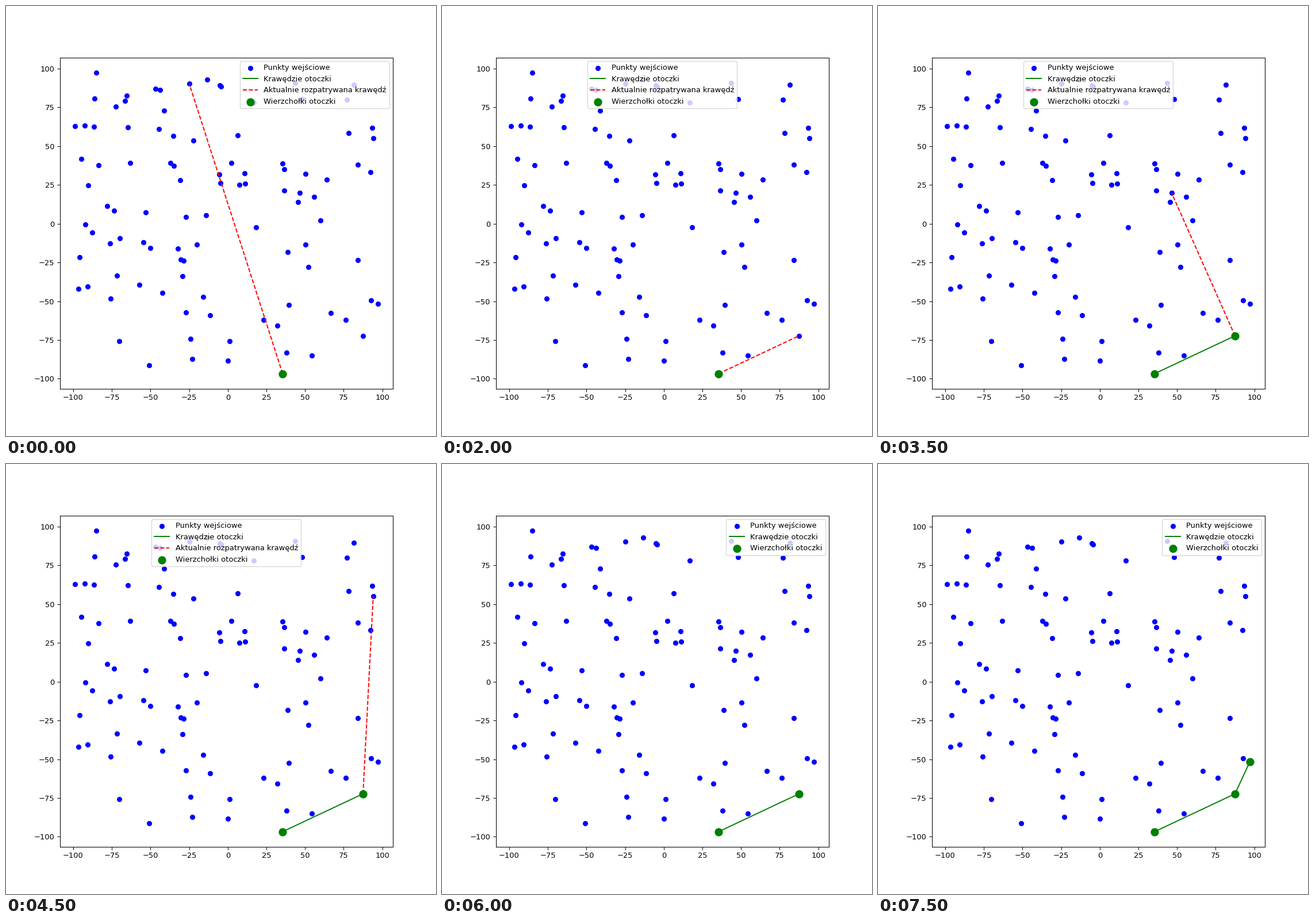
Animation, 748 px wide and 748 px high, one loop 8000 ms. Source, as a matplotlib script:

```python
import random

import matplotlib.pyplot as plt
from matplotlib.animation import FuncAnimation

random.seed(12)
COUNT = 100

START = (35.5, -96.7)
CORNERS = [(-85.1, 97.4), (-98.9, 63.0)]
# Points that become candidates, in scanning order
SCAN = [(-24.9, 90.2), (46.5, 19.8), (66.6, -57.5), (93.4, 61.7), (94.1, 55.1),
        (54.4, -85.1), (92.7, -49.6), (87.5, -72.3), (97.1, -51.6)]


def cross(o, a, b):
    return (a[0] - o[0]) * (b[1] - o[1]) - (a[1] - o[1]) * (b[0] - o[0])


def candidates(vertex, scan):
    """Each point that turns further clockwise than the best one so far."""
    best = scan[0]
    found = [best]
    for point in scan[1:]:
        if cross(vertex, best, point) < 0:
            best = point
            found.append(best)
    return found


# One step per candidate, then one without a candidate
hull, steps = [START], []
for first in (0, 0, 3):
    found = candidates(hull[-1], SCAN[first:])
    steps += [(len(hull), target) for target in found + [None]]
    hull.append(found[-1])

# Fill up with random points inside the hull
points = [START] + CORNERS + SCAN
while len(points) < COUNT:
    point = random.uniform(-98, 97), random.uniform(-93, 97)
    if all(cross(a, b, point) > 0 for a, b in zip(hull, hull[1:])):
        points.append(point)

fig, ax = plt.subplots(figsize=(8, 8), dpi=93.5)


def draw(i):
    size, target = steps[i]
    done = hull[:size]
    ax.clear()
    ax.scatter(*zip(*points), color="blue", label="Punkty wejściowe")
    ax.plot(*zip(*done), "g-", label="Krawędzie otoczki")
    if target:
        ax.plot(*zip(done[-1], target), "r--",
                label="Aktualnie rozpatrywana krawędź")
    ax.scatter(*zip(*done), color="green", s=100, zorder=5,
               label="Wierzchołki otoczki")
    # The legend keeps clear of edges that end on the right
    side = "center" if target and target[0] > 0 else "right"
    ax.legend(loc="upper " + side)
    return []


anim = FuncAnimation(fig, draw, frames=len(steps), init_func=lambda: [],
                     interval=500, repeat=True, repeat_delay=0)
plt.show()
```
